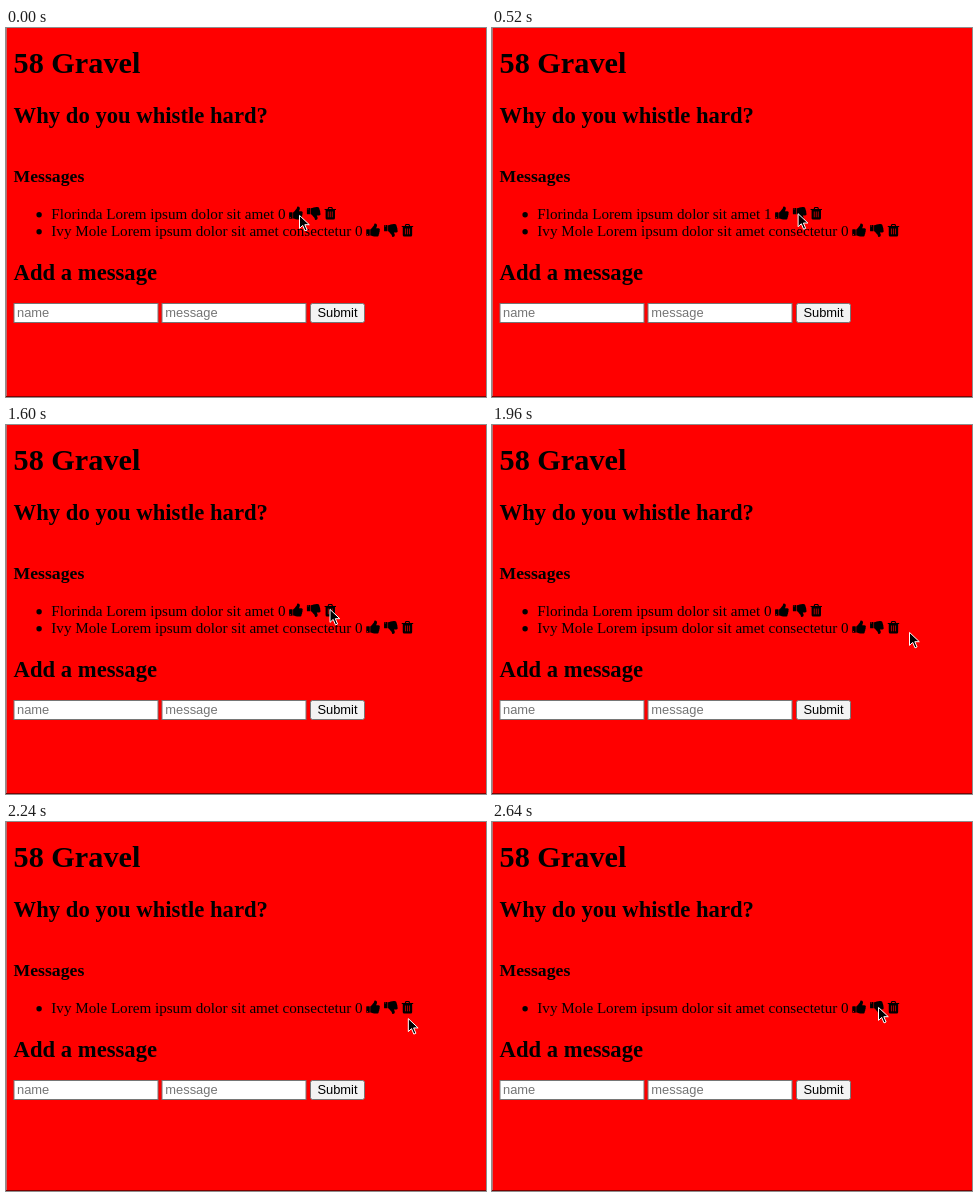
Write an HTML page that moves like this. It is 480 px wide and 369 px high and loops after 2680 ms.

```html
<!DOCTYPE html>
<html lang="en">
<head>
<meta charset="utf-8">
<title>Messages</title>
<style>
  html, body { margin: 0; width: 100%; height: 100%; overflow: hidden; background: #f00; }
  svg { display: block; width: 480px; height: 369px; }
  text { font: 15.11px "Liberation Serif", "Times New Roman", serif; }
  .h1, .h2, .h3 { font-weight: bold; }
  .h1 { font-size: 2em; font-size: 30.22px; }
  .h2 { font-size: 22.67px; }
  .h3 { font-size: 17.68px; }
  .ui { font: 12.9px "Liberation Sans", Arial, sans-serif; }
  .hint { fill: #757575; }
  .box { fill: #fff; stroke: #767676; }
  .button { fill: #f3f3f3; stroke: #767676; }
</style>
</head>
<body>
<svg viewBox="0 0 480 369">
  <defs>
    <g id="thumb">
      <path fill-rule="evenodd" d="M.9 5.8h2.5q.5 0 .5.5v5.4q0 .5-.5.5H.9q-.5 0-.5-.5V6.3q0-.5.5-.5zM1.6 10.5a.55.55 0 1 0 .01 0z"/>
      <path d="M4.4 5.9C5.6 5.6 6.7 3.4 7.7 2.5 8.5 1.7 8.1 0 9.1 0c1.7 0 2.2 1.2 2 2.5-.1.9-.7 1.5-.8 2.2h2.2c1.5 0 2 1.5 1.2 2.5.3.8.2 1.4-.3 1.9.2.8 0 1.4-.5 1.8.1 1.5-.8 2.2-2.1 2.2-2.6.2-4.5-.9-6.4-1.2z"/>
    </g>
    <g id="trash">
      <path d="M1.2 3H10.6V11.4q0 1.7-1.4 1.7H2.6q-1.4 0-1.4-1.7z"/>
      <path d="M.2 3H11.6M3.7 2.8 4.4 1H7.4L8.1 2.8" fill="none" stroke="#000" stroke-width="1.1"/>
      <path d="M3.9 5V10.8M5.9 5V10.8M7.9 5V10.8" stroke="#f00" stroke-width=".7"/>
    </g>
    <g id="actions">
      <use href="#thumb"/>
      <use href="#thumb" transform="translate(17.8 13.6) scale(1 -1)"/>
      <use href="#trash" x="35.7"/>
    </g>
    <rect id="input" class="box" width="144" height="19"/>
  </defs>

  <rect width="480" height="369" fill="#f00"/>
  <rect width="1" height="369" fill="#b87070"/>
  <rect y="368" width="480" height="1" fill="#800000"/>

  <text class="h1" x="7.6" y="45.3">58 Gravel</text>
  <text class="h2" x="7.6" y="95">Why do you whistle hard?</text>
  <text class="h3" x="7.6" y="154.3">Messages</text>

  <g id="first"></g>
  <g id="rest">
    <g id="second"></g>
    <text class="h2" x="7.6" y="251.5">Add a message</text>
    <use href="#input" x="8" y="275.5"/>
    <text class="ui hint" x="11" y="289.2">name</text>
    <use href="#input" x="156" y="275.5"/>
    <text class="ui hint" x="159.3" y="289.2">message</text>
    <rect class="button" x="304.5" y="275.5" width="54" height="19" rx="2"/>
    <text class="ui" x="331.5" y="289.2" text-anchor="middle">Submit</text>
  </g>

  <path id="cursor" d="M.5 1.4V14.4L3.7 11.4 6 16.9 8.1 16 5.8 10.7H10.3z" stroke="#fff"/>
</svg>
<script>
  const LOOP = 2680, STEP = 40;
  const LIKED = 120, DISLIKED = 960, DELETED = 2000, ROW = 17;
  const INDENT = 45.3, BASELINE = 190.7;

  const home = { x: 293, y: 186 };
  const glides = [
    { from: 160, to: 760, x: 308, y: 184 },
    { from: 1200, to: 1400, x: 323.5, y: 183 },
    { from: 1800, to: 1960, x: 417, y: 206 },
    { from: 2080, to: 2640, x: 386, y: 184 }
  ];

  const byId = id => document.getElementById(id);
  const first = byId("first"), rest = byId("rest"), cursor = byId("cursor");

  // Fills a list row; the icons follow the measured text. Returns the counter.
  function fillRow(group, message, y) {
    group.innerHTML = `
      <circle cx="${INDENT - 12.2}" cy="${y - 4}" r="2.7"/>
      <text x="${INDENT}" y="${y}">${message} <tspan>0</tspan></text>`;
    const end = INDENT + group.querySelector("text").getComputedTextLength();
    group.insertAdjacentHTML("beforeend",
      `<use href="#actions" x="${end + 3.2}" y="${y - 12.2}"/>`);
    return group.querySelector("tspan");
  }

  const count = fillRow(first, "Florinda Lorem ipsum dolor sit amet", BASELINE);
  fillRow(byId("second"), "Ivy Mole Lorem ipsum dolor sit amet consectetur", BASELINE + ROW);

  const easeOut = k => 1 - (1 - k) ** 2;

  function pointerAt(t) {
    let { x, y } = home;
    for (const glide of glides) {
      const k = Math.min(1, Math.max(0, (t - glide.from) / (glide.to - glide.from)));
      x += (glide.x - x) * easeOut(k);
      y += (glide.y - y) * easeOut(k);
    }
    return [x, y];
  }

  function draw(t) {
    const deleted = t >= DELETED;
    count.textContent = t >= LIKED && t < DISLIKED ? "1" : "0";
    first.setAttribute("visibility", deleted ? "hidden" : "visible");
    rest.setAttribute("transform", `translate(0 ${deleted ? -ROW : 0})`);
    cursor.setAttribute("transform", `translate(${pointerAt(t)})`);
  }

  const start = performance.now();
  function tick() {
    const t = (performance.now() - start) % LOOP;
    draw(Math.floor(t / STEP) * STEP);
    requestAnimationFrame(tick);
  }
  tick();
</script>
</body>
</html>
```
